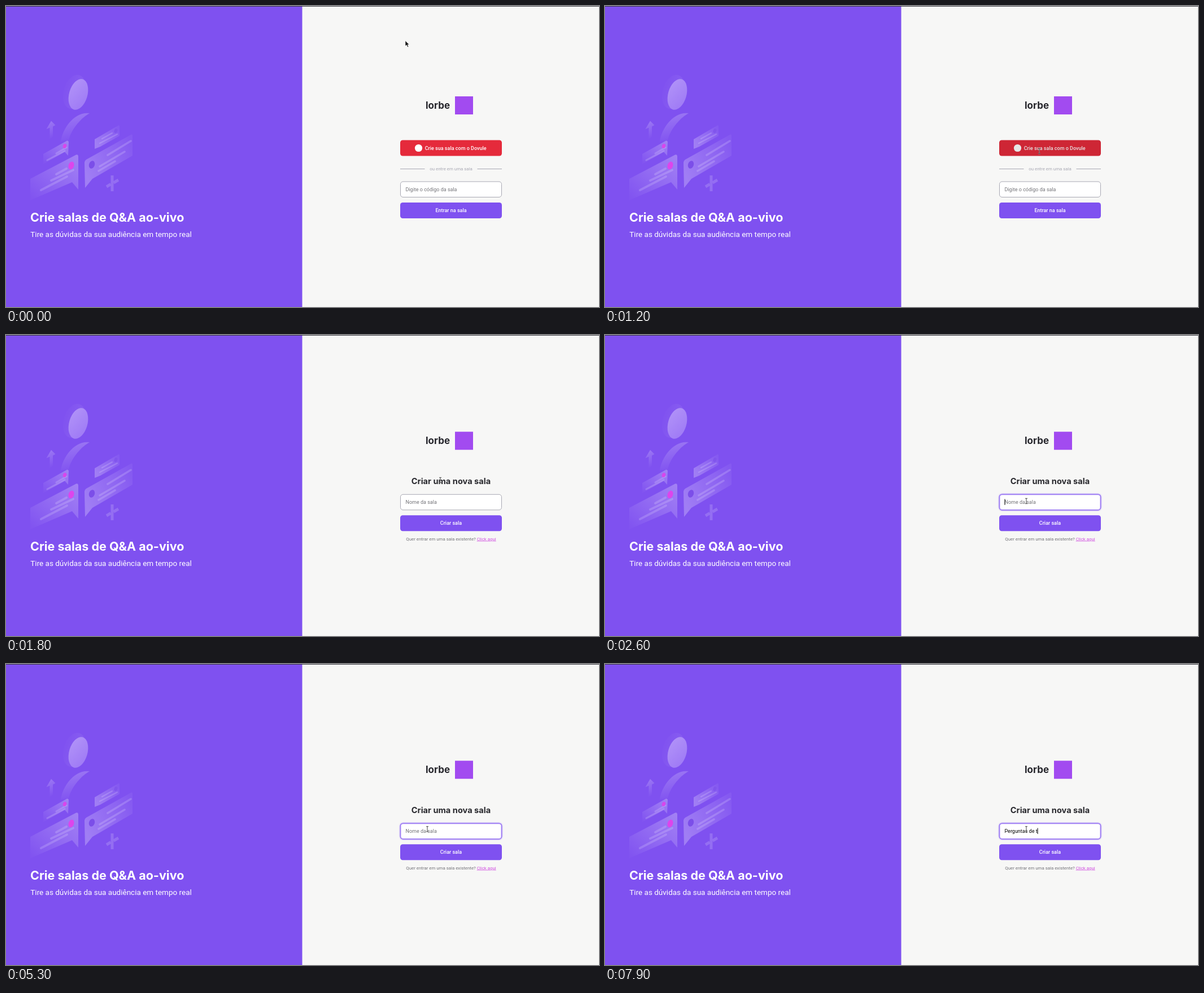
An HTML page for the animation above (8 s loop, 1050 px wide and 533 px high).

```html
<!DOCTYPE html>
<html lang="pt-BR">
<head>
<meta charset="utf-8">
<title>Salas ao vivo</title>
<style>
  html, body { margin: 0; width: 100%; height: 100%; overflow: hidden; background: #f7f7f6; }
  svg { display: block; width: 1050px; height: 533px; }
  text { font: 9px Roboto, sans-serif; white-space: pre; }
  .title { font: 700 21.5px Inter, sans-serif; fill: #fff; }
  .sub { font-size: 13.5px; fill: #fff; }
  .brand { font: 700 17px Inter, sans-serif; fill: #25252b; }
  .heading { font: 700 14.6px Inter, sans-serif; fill: #29292e; }
  .label { font-weight: 500; fill: #fff; }
  .hint { fill: #737378; }
  .small { font-size: 7.875px; }
  .mid { text-anchor: middle; }
  .field { fill: #fff; stroke: #a8a8b3; }
  .focus .field { stroke: #9d7cf3; stroke-width: 1.8; filter: drop-shadow(0 0 1.2px #9d7cf3); }
  .status { font: 8.4px "Noto Sans", sans-serif; fill: #dcdcdc; }
</style>
</head>
<body>
<svg viewBox="0 0 1050 533">
  <defs>
    <linearGradient id="down" x1="0" y1="0" x2=".2" y2="1">
      <stop stop-color="#fff" stop-opacity=".24"/><stop offset="1" stop-color="#fff" stop-opacity=".02"/>
    </linearGradient>
    <linearGradient id="left" x1="1" y1="0" x2=".1" y2="1">
      <stop stop-color="#fff" stop-opacity=".28"/><stop offset="1" stop-color="#fff" stop-opacity=".02"/>
    </linearGradient>
    <linearGradient id="right" x1="0" y1=".7" x2="1" y2=".2">
      <stop stop-color="#fff" stop-opacity=".26"/><stop offset="1" stop-color="#fff" stop-opacity=".05"/>
    </linearGradient>
    <linearGradient id="head" x1="0" y1="0" x2="1" y2="1">
      <stop stop-color="#b294f8"/><stop offset="1" stop-color="#9d78f5"/>
    </linearGradient>
    <linearGradient id="shade" x1="0" y1="0" x2="1" y2="0">
      <stop stop-color="#fff" stop-opacity=".01"/><stop offset="1" stop-color="#fff" stop-opacity=".08"/>
    </linearGradient>
    <g id="logo">
      <text class="brand" x="743" y="182">lorbe</text>
      <rect x="795" y="160" width="32" height="32" fill="#a24bf0"/>
    </g>
  </defs>

  <rect width="1050" height="533" fill="#f7f7f6"/>
  <rect width="524.5" height="533" fill="#7f51f0"/>

  <g id="art">
    <ellipse cx="121" cy="152" rx="19" ry="31" transform="rotate(16 121 152)" fill="url(#shade)"/>
    <ellipse cx="128" cy="156.5" rx="16.2" ry="28" transform="rotate(16 128 156.5)" fill="url(#head)"/>
    <path d="M97 240C100 216 122 186 148 190C136 196 116 216 111 238Z" fill="url(#down)"/>
    <path d="M71.5 218L80 203.5L87.5 211L83 213.5V230Q82 234 77.5 235V215.500Z" fill="url(#down)"/>
    <path d="M66 262L108 238.500Q111 238 111 241L110 265L104 258.500L66 280Z" fill="url(#left)"/>
    <path d="M43 306L124 263.500Q128 262 128 267V325L117 312L43 344Z" fill="url(#left)"/>
    <path d="M139 277Q139 274 142 272L221 228Q224 226 224 230V265L153 306L140 322Z" fill="url(#right)"/>
    <path d="M157 236L198 212Q201 210 201 213V230L167 249L157 253Z" fill="url(#right)"/>
    <g fill="none" stroke="#fff" stroke-opacity=".17" stroke-linecap="round">
      <path stroke-width="3" d="M89 261L107 250.500M73 273L104 256.500"/>
      <path stroke-width="4" d="M89 298L107 288M80 309L119 290.500M62 326L108 302"/>
      <path stroke-width="3.500" d="M180 264L221 239M166 284L210 258M164 292L193 275"/>
      <path stroke-width="2.500" d="M170 235L188 225M166 243L197 227"/>
      <path stroke-width="5" stroke-linecap="butt" d="M188 300V328M178 320L185.500 315.500M190.500 313L199 308"/>
    </g>
    <ellipse cx="104" cy="248" rx="3.200" ry="4" transform="rotate(20 104 248)" fill="#d846ec"/>
    <ellipse cx="115.500" cy="282.500" rx="4.800" ry="7" transform="rotate(18 115.500 282.500)" fill="#dd45ec"/>
    <ellipse cx="152" cy="281" rx="5" ry="7" transform="rotate(18 152 281)" fill="#7c4ee9"/>
    <ellipse cx="194.500" cy="221" rx="2.800" ry="4" transform="rotate(18 194.500 221)" fill="#8055ec"/>
  </g>
  <text class="title" x="43" y="381.700">Crie salas de Q&amp;A ao-vivo</text>
  <text class="sub" x="43.300" y="409.300">Tire as dúvidas da sua audiência em tempo real</text>

  <g id="home">
    <use href="#logo"/>
    <g id="login">
      <rect x="698" y="237.500" width="180" height="28" rx="4.500" fill="#e52a3b"/>
      <circle cx="730.500" cy="251.500" r="6.600" fill="#fff"/>
      <text class="label" x="741.700" y="255.200">Crie sua sala com o Dovule</text>
    </g>
    <path d="M698 288.500H741.500M834.500 288.500H878" stroke="#a8a8b3"/>
    <text class="small mid" x="788" y="291" fill="#a8a8b3">ou entre em uma sala</text>
    <rect class="field" x="698.500" y="311" width="179" height="27.500" rx="4.500"/>
    <text class="hint" x="707.500" y="328.200">Digite o código da sala</text>
    <rect x="698" y="348" width="180" height="28" rx="4.500" fill="#7f51f0"/>
    <text class="label mid" x="788" y="365.200">Entrar na sala</text>
  </g>

  <g id="create">
    <use href="#logo" y="11.300"/>
    <text class="heading mid" x="788" y="263.500">Criar uma nova sala</text>
    <rect class="field" x="698.500" y="282.300" width="179" height="27.500" rx="4.500"/>
    <text class="hint" id="hint" x="707.500" y="299">Nome da sala</text>
    <text id="typed" x="707.500" y="299"></text>
    <rect id="caret" y="290.500" width="1" height="10.500"/>
    <rect x="698" y="319.200" width="180" height="28" rx="4.500" fill="#7f51f0"/>
    <text class="label mid" x="788" y="336.200">Criar sala</text>
    <text class="hint small mid" x="788" y="363.600">Quer entrar em uma sala existente? <tspan fill="#d050e0" text-decoration="underline">Click aqui</tspan></text>
  </g>

  <g id="status">
    <rect y="522" width="348" height="11" fill="#202024"/>
    <text class="status" x="1" y="531">Waiting for www.googleapis.com…</text>
  </g>
  <rect width="1050" height="1" fill="#3a3a40"/>

  <path id="arrow" d="M0 0V9.500L2.300 7.500L4 11.200L5.700 10.400L4.100 7H7Z" fill="#111" stroke="#fff" stroke-width=".6"/>
  <g id="beam" fill="none">
    <path d="M-2 -4.600H2M0 -4.600V4.600M-2 4.600H2" stroke="#ddd" stroke-opacity=".5" stroke-width="1.800"/>
    <path d="M-2 -4.600H2M0 -4.600V4.600M-2 4.600H2" stroke="#444" stroke-width=".9"/>
  </g>
</svg>
<script>
const $ = id => document.getElementById(id);
const LOOP = 8000;

// [time, x, y] pointer stops
const pointer = [
  [0, 707, 61.5], [300, 650, 125], [400, 598.5, 183],
  [600, 625, 200], [700, 680, 226], [800, 728, 246], [900, 757, 255], [1000, 769, 257],
  [2100, 763, 276], [2200, 748, 315], [2300, 746, 303], [2400, 746, 294],
  [3000, 746, 293], [3500, 746, 292.3]
];
// [time, text in the field]
const typing = [
  [0, ''], [3900, 'P'], [4200, 'Pe'], [4900, 'P'], [5300, ''], [5500, 'P'], [5600, 'Pe'],
  [5800, 'Per'], [6100, 'Perg'], [6700, 'Pergun'], [6900, 'Pergunt'], [7200, 'Pergunta'],
  [7300, 'Perguntas '], [7600, 'Perguntas de '], [7900, 'Perguntas de t']
];
const caretOn = [[0, false], [2600, true], [3200, false], [3800, true], [4900, false], [5500, true]];
const statusAlpha = [[0, 0], [1300, 1], [1600, 0.5], [1800, 0]];

const at = (list, t) => list.findLast(step => step[0] <= t);
const show = (id, on) => $(id).style.display = on ? '' : 'none';

function draw(t) {
  const [, x, y] = at(pointer, t);
  const hover = t >= 800;
  show('home', t < 1300);
  show('create', t >= 1300);
  $('login').style.filter = hover ? 'brightness(.9)' : 'none';
  $('create').classList.toggle('focus', t >= 2600);

  for (const id of ['arrow', 'beam']) $(id).setAttribute('transform', `translate(${x} ${y})`);
  show('arrow', !hover);
  show('beam', hover);

  const text = at(typing, t)[1];
  $('typed').textContent = text;
  show('hint', !text);
  show('caret', at(caretOn, t)[1]);
  const width = text ? $('typed').getComputedTextLength() : 0;
  $('caret').setAttribute('x', 707.5 + width);
  $('status').style.opacity = at(statusAlpha, t)[1];
}

function tick() {
  draw(performance.now() % LOOP);
  requestAnimationFrame(tick);
}
tick();
</script>
</body>
</html>
```
